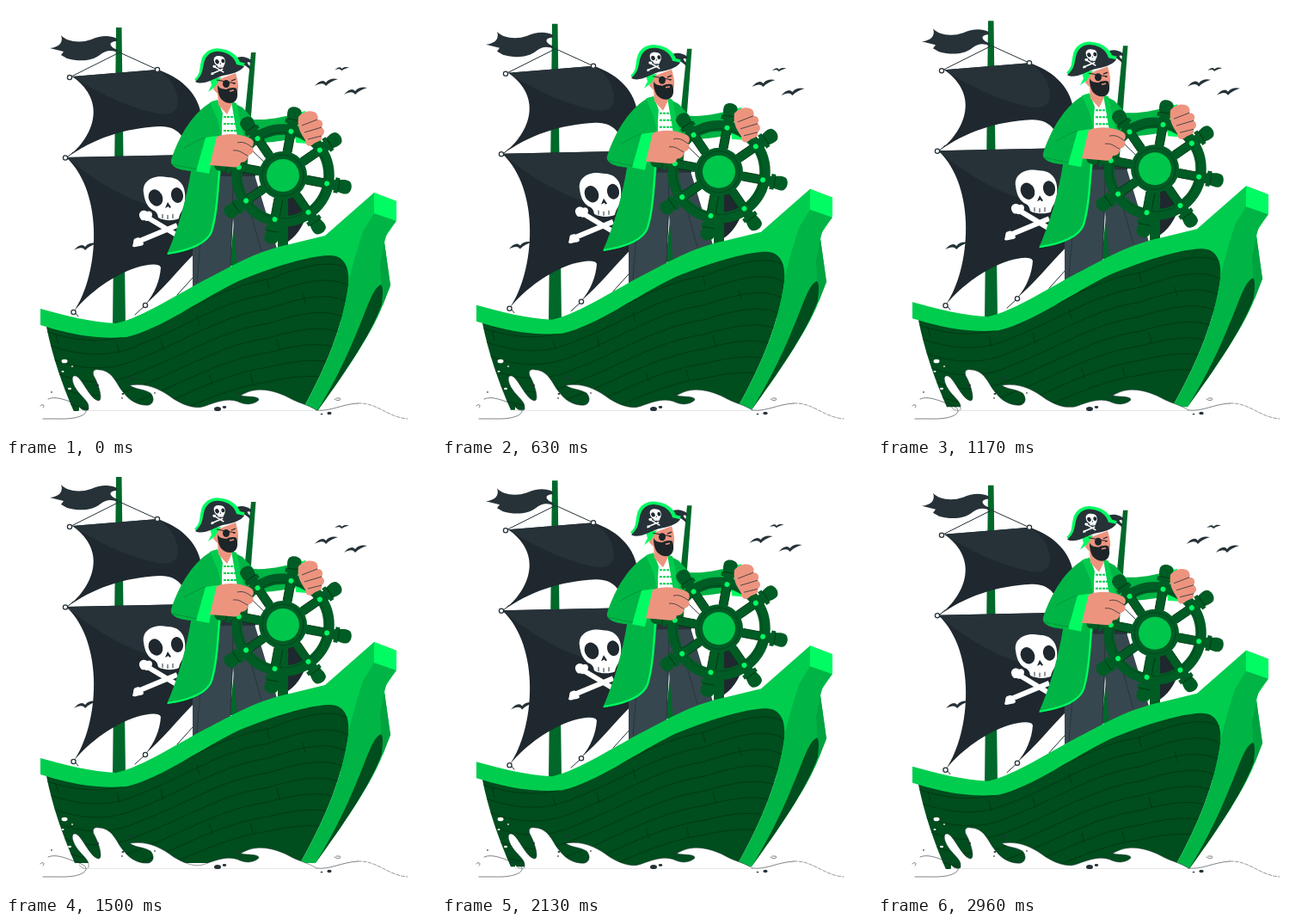
Write an HTML page that moves like this. It is 500 px wide and 500 px high and loops after 3 s.

```html
<!DOCTYPE html>
<html lang="en">
<head>
<meta charset="utf-8">
<title>Pirate ship</title>
<style>
html, body { margin: 0; width: 100%; height: 100%; overflow: hidden; background: #fff; }
svg { display: block; width: 100vw; height: 100vh; }
.navy { fill: #263238; }
.sail { fill: #1f282e; }
.wood { fill: #00682a; }
.wheel { fill: #005c25; }
.hull { fill: #004d1e; }
.rail { fill: #00cd4e; }
.coat { fill: #00b545; }
.lime { fill: #00fb62; }
.skin { fill: #ed947f; }
.white { fill: #fff; }
.line { fill: none; stroke: #263238; stroke-width: 1; stroke-linecap: round; stroke-linejoin: round; }
.ring { fill: #fff; stroke: #263238; stroke-width: 1.3; }
.seam { fill: none; stroke: #00380f; stroke-width: .9; }
.trim { fill: none; stroke: #00fb62; stroke-width: 2.2; }
</style>
</head>
<body>
<svg viewBox="0 0 500 500">
<defs>
  <clipPath id="hullClip">
    <path id="hullShape" d="M47 373C75 382 110 388 140 385C180 376 228 340 270 320C308 304 350 291 375 290C394 289 400 305 398 325C392 370 373 420 342 474H80C66 442 54 408 47 373Z"/>
  </clipPath>
  <path id="bird" class="navy" d="M-14 4C-9-2-4-4-1 0C3-5 8-5 13-4C7-2 3 0-1 4C-4 0-8 1-14 4Z"/>
  <g id="skull">
    <path d="M163 245L203 269M151 275L199 255" fill="none" stroke="#fff" stroke-width="6"/>
    <path class="white" d="M155 244C154 239 160 236 164 239C168 237 172 241 169 246C167 250 163 251 161 249C158 250 156 248 155 244ZM147 279C149 275 147 271 151 270C155 268 158 271 157 274C162 275 160 279 156 279C152 279 149 282 147 279Z"/>
    <path class="white" d="M160 217C158 203 172 196 187 199C203 199 210 210 208 227C207 237 202 240 201 247C196 250 183 250 177 246C176 241 175 239 170 237C164 233 161 226 160 217Z"/>
    <ellipse class="sail" cx="174" cy="223" rx="8" ry="10" transform="rotate(-25 174 223)"/>
    <ellipse class="sail" cx="199" cy="220" rx="7" ry="9" transform="rotate(-12 199 220)"/>
    <path class="sail" d="M185 235L188 228L192 234L190 235L189 233Z"/>
    <path d="M182 242V247M188 243V248M194 242V247" stroke="#263238" fill="none"/>
  </g>
</defs>

<g id="rightBirds">
  <use href="#bird" x="373" y="89"/>
  <use href="#bird" x="407" y="99"/>
  <use href="#bird" transform="translate(391 73) rotate(8) scale(.6)"/>
</g>
<use id="leftBird" href="#bird" x="93" y="280"/>

<g id="ship">
  <!-- rigging and sails -->
  <path class="wood" d="M128 25H134.500L139 372H124Z"/>
  <path class="navy" d="M129 38C119 33 109 35 99 39C85 44 70 41 64 34C67 42 62 48 51 49L67 53L64 57L71 61C85 65 100 64 109 57C116 51 123 51 130 54L130 51C120 48 118 41 129 41Z"/>
  <path class="line" d="M132 54L74 83M132 54L176 74M70 177L78 170M79 355L84 361M162 348L150 359M218 315L199 336"/>
  <path class="sail" d="M77 82L176 74C201 82 222 99 227 126L208 160C204 145 193 140 178 140C138 142 101 154 70 177C100 155 120 112 77 82Z"/>
  <path class="navy" d="M77 82L176 74C191 82 200 97 200 113C199 125 188 128 172 124C137 116 105 100 77 82Z"/>
  <path class="sail" d="M70 176L214 173L222 285C200 307 182 330 162 347C173 334 179 319 180 304C178 299 166 300 152 304C125 313 98 332 79 355C108 313 115 218 70 176Z"/>
  <path class="navy" d="M70 176L214 173V236C174 243 116 215 70 176Z"/>
  <use href="#skull"/>
  <g class="ring">
    <circle cx="74" cy="83" r="2.600"/><circle cx="176" cy="74" r="2.600"/>
    <circle cx="69" cy="176.500" r="2.600"/><circle cx="78.500" cy="356" r="2.600"/>
    <circle cx="162" cy="348" r="2.600"/>
  </g>

  <!-- rear mast -->
  <path class="sail" d="M322 203C342 214 354 232 348 247C343 261 333 273 318 280Z"/>
  <path class="wood" d="M285 54L290.500 54L272 302L260 302Z"/>
  <path class="navy" d="M285 63C277 57 271 59 264 61L270 64L266 70C274 66 278 68 284 74V70C279 66 280 64 285 66Z"/>
  <path class="line" d="M278 160L309 190"/>

  <!-- pirate -->
  <path d="M248 193L217 283V330L261 304L264 247L269 304L315 282L288 193Z" fill="#37474f"/>
  <path d="M264 205L261 302M276 210L297 285M228 250L222 322" fill="none" stroke="#263238" stroke-width=".8"/>
  <path class="navy" d="M247 187H290V198H247Z"/>
  <path class="coat" d="M263 112L275 118L288 132C309 133 326 128 344 123L349 151C323 158 296 159 279 161Z"/>
  <path class="lime" d="M334 126L348 122L350 160L337 159Z"/>
  <path class="white" d="M247 114L265 111C271 128 272 162 270 190H246Z"/>
  <path d="M253 129H267M253 137H268M253 145H269" fill="none" stroke="#00d04f" stroke-width="2" stroke-dasharray="3 1"/>
  <path class="rail" d="M262 111L268 113L278 160L272 170Z"/>
  <path class="coat" d="M242 110C219 121 201 151 192 179C190 187 202 191 215 192C210 224 200 260 187 289C212 286 234 277 240 263C247 242 247 218 250 190L251 142L250 121Z"/>
  <path class="trim" d="M188 288C214 284 234 276 239 262C245 241 246 218 248 191"/>
  <path class="rail" d="M237 112L246 109L252 125L250 150L246 132Z"/>
  <path class="lime" d="M232 153L246 151L236 195L221 192Z"/>
  <path d="M207 165C216 160 224 155 232 153M193 184L222 190" fill="none" stroke="#00963c"/>
  <path class="skin" d="M246 101L264 103L263 114L257 126L247 115Z"/>
  <path class="skin" d="M243 87L267 78C270 87 272 98 267 105L252 108L241 97Z"/>
  <path d="M246 92C249 97 252 96 256 97C260 95 265 94 268 96C271 106 268 113 260 113C251 112 246 106 246 92Z" fill="#1d2529"/>
  <path d="M260 99L265 98" stroke="#ed947f" stroke-width="1.500"/>
  <path class="lime" d="M237 85L250 83L243 94L235 100L239 92Z"/>
  <path d="M245 86L267 90" fill="none" stroke="#1d2529"/>
  <ellipse cx="256" cy="90.500" rx="4" ry="4.500" fill="#1d2529"/>
  <path d="M262 87L267 85M264 90H266" stroke="#1d2529" stroke-width="1.300"/>
  <path class="trim" style="stroke-width:5" d="M221 87C229 79 227 75 229 66C231 54 241 51 248 52C260 53 268 60 270 67L277 69"/>
  <path class="navy" d="M220 88C229 80 228 75 230 67C232 56 241 52 248 53C259 54 266 60 268 68L277 70C272 77 262 79 252 81C240 85 229 93 220 88Z"/>
  <use href="#skull" transform="translate(198.500 4.500) scale(.27)"/>

  <!-- steering wheel -->
  <path class="wheel" d="M316 220H328V284H316Z"/>
  <g transform="translate(322 197)">
    <circle r="53.500" fill="none" stroke="#005c25" stroke-width="12.500"/>
    <circle r="50" fill="none" stroke="#00471a" stroke-width="1"/>
    <g id="spokes"></g>
    <circle class="wheel" r="28"/>
    <circle r="24" fill="none" stroke="#00471a"/>
    <circle r="19" fill="#00c64b"/>
  </g>

  <!-- hands -->
  <path class="skin" d="M245 152C258 147 271 149 282 153C289 155 289 161 286 164C290 168 286 173 281 174C282 179 277 182 273 182C272 188 266 188 260 187L237 185Z"/>
  <path class="skin" d="M340 129C347 121 357 121 361 125C364 130 362 132 362 132C369 132 369 138 367 141C372 145 370 149 367 151C369 157 362 157 358 160C352 166 348 161 348 156C344 149 338 143 340 129Z"/>
  <path d="M269 159C277 157 281 161 286 164M264 168C272 167 276 172 281 174M344 139L362 132M347 147L367 141M351 155L367 151" fill="none" stroke="#263238" stroke-width=".8"/>

  <!-- hull -->
  <path class="rail" d="M40 352C70 360 100 368 128 369C162 361 200 334 240 314C267 300 292 285 330 277L371 267L428 217L454 227L453 251L420 300L392 370L350 330L140 396L62 384L47 373L40 371Z"/>
  <use href="#hullShape" class="hull"/>
  <g id="planks" clip-path="url(#hullClip)"></g>
  <path class="coat" d="M428 241L415 262C408 285 402 303 398 325C392 370 373 420 342 474H360C390 432 424 384 438 348L447 325L440 275L443 264L454 250Z"/>
  <path fill="#00a33f" d="M440 275L447 325L438 348L435 300Z"/>
  <path class="hull" d="M436 324C426 328 420 352 406 384C392 418 377 446 360 474C390 432 424 384 437 347C438 336 439 327 436 324Z"/>
  <path class="lime" d="M428 217L454 227V250L428 241Z"/>
</g>

<!-- water -->
<path class="white" d="M60 471H400V500H60Z"/>
<path class="white" stroke="#263238" stroke-width=".5" d="M85 466C90 472 97 472 96 467C97 460 88 455 82 446C76 437 76 430 80 430C88 430 97 458 108 459C113 458 108 440 102 430C100 424 103 422 108 423C125 424 128 440 137 450C146 462 158 465 166 464C173 462 172 454 168 450C160 445 150 446 144 441C165 438 180 446 195 457C210 466 222 469 232 465C250 458 262 456 272 461C282 465 290 462 294 458C294 453 280 455 273 453C290 442 310 446 328 455C340 462 350 463 361 470L361 471H85"/>
<path class="white" d="M84 470.500H363V474H84Z"/>
<path class="line" stroke-width=".7" d="M43 480H62C91 481 102 470 85 464C69 458 58 453 49 457M40 465C42 462 46 464 43 467M361 470C377 472 390 463 409 462M382 457C386 460 390 459 388 456L384 456" style="stroke-width:.6"/>
<path class="line" stroke-dasharray="4 2" style="stroke-width:.5" d="M409 462C432 461 443 478 467 480"/>
<g id="drops"></g>
</svg>
<script>
const $ = id => document.getElementById(id);

for (let i = 0; i < 8; i++) {
  $("spokes").innerHTML += `<g transform="rotate(${10.5 + 45 * i})">
    <path class="wheel" d="M24-5H50V5H24ZM57-6H61V-9H66V-7C70-8 75-9 78-7C82-4 82 4 78 7C75 9 70 8 66 7V9H61V6H57Z"/>
    <path class="seam" d="M28-5H48M28 5H48M66-7V7"/>
    <circle class="lime" cx="52" r="3"/></g>`;
}

let planks = "";
for (let k = 0; k < 8; k++) {
  const y = 378 + 16 * k;
  planks += `M${44 + 4 * k} ${y}C85 ${y + 13} 120 ${y + 16} 155 ${y}
    C210 ${y - 21} 250 ${y - 52 + k} 305 ${318 + 17 * k}C345 ${302 + 18 * k} 380 ${293 + 19 * k} 400 ${307 + 20 * k}`;
}
const joints = [[129, 392], [180, 388], [222, 360], [303, 317], [345, 334], [315, 387], [237, 429], [284, 427], [58, 381]];
for (const [x, y] of joints) planks += `M${x} ${y}l3 12`;
$("planks").innerHTML = `<path class="seam" d="${planks}"/>`;

// x, y, radius, light or dark
const drops = [
  [68, 413, 3.5, 1], [66, 425, 1.5, 1], [77, 419, 1.2, 1], [74, 445, 2, 1], [82, 442, 2, 1],
  [106, 441, 2, 0], [146, 433, 2, 0], [136, 451, 1.5, 0], [135, 456, 1, 0], [173, 450, 1, 0],
  [246, 468.5, 4, 0], [254, 466.5, 2.3, 0], [271, 451, 1.7, 0], [272, 456, 1.2, 0],
  [376, 473.5, 2.6, 0], [367, 474.5, 1.3, 0], [53, 449, 1, 0]
];
$("drops").innerHTML = drops.map(([x, y, r, light]) =>
  `<ellipse class="${light ? "white" : "navy"}" cx="${x}" cy="${y}" rx="${r}" ry="${r * .65}"/>`).join("");

const start = performance.now();
function draw(now) {
  const p = Math.max(0, now - start) % 3000 / 3000;
  const rise = 10 * (1 - Math.abs(1 - 2 * p));
  const drift = 1.5 * Math.sin(2 * Math.PI * p);
  const move = (id, x, y) => $(id).setAttribute("transform", `translate(${x} ${y})`);
  move("ship", 0, -rise);
  move("rightBirds", drift, drift * .7);
  move("leftBird", -drift * .8, -drift);
  requestAnimationFrame(draw);
}
draw(start);
</script>
</body>
</html>
```
